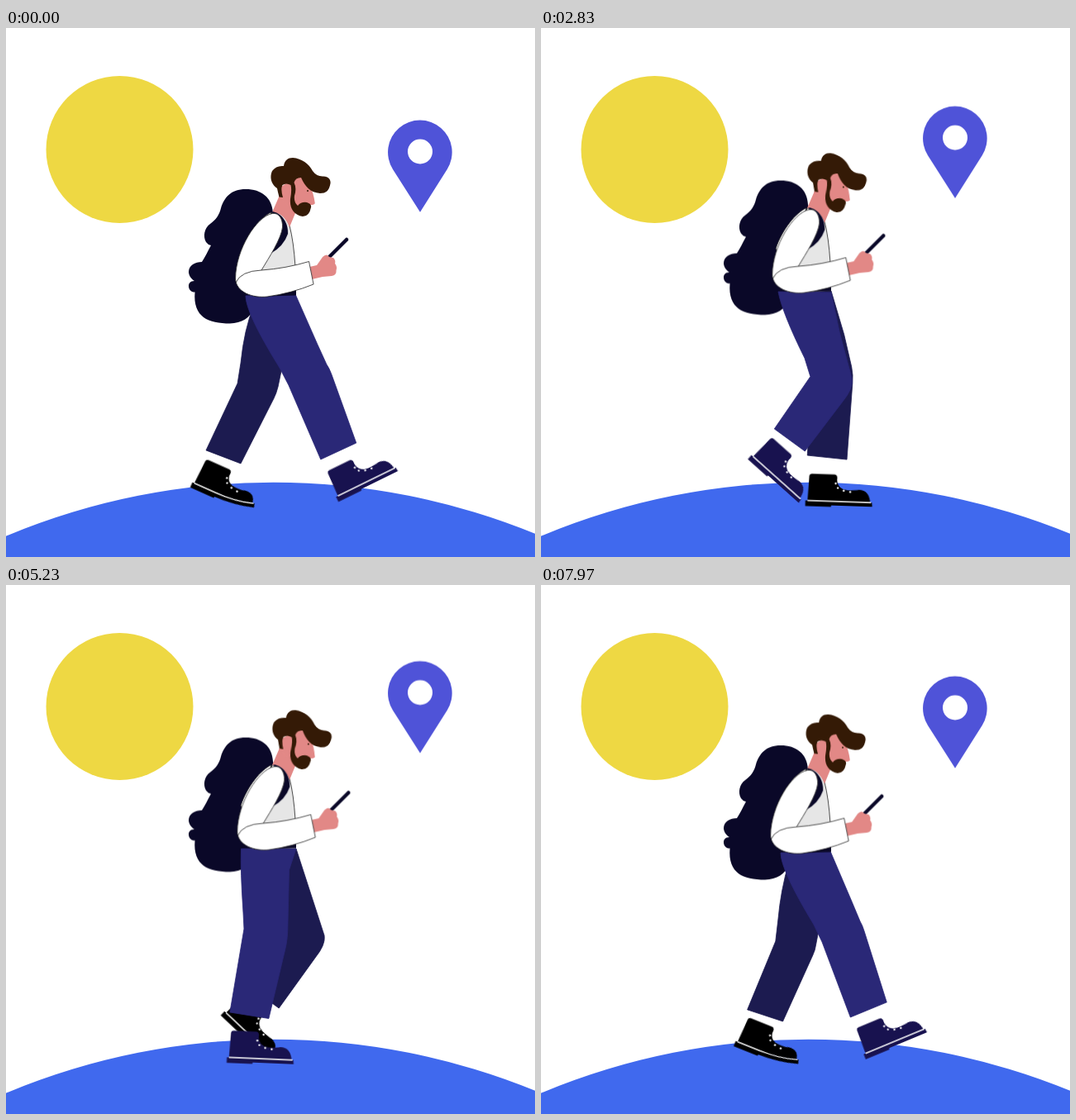
These frames come from a looping animation (640 by 640 pixels, 8000 ms). An HTML page without scripts:

```html
<!DOCTYPE html>
<html lang="en">
<head>
<meta charset="utf-8">
<title>Hiker</title>
<style>
html, body { margin: 0; width: 100%; height: 100%; overflow: hidden; background: #fff; }
svg { display: block; width: 100%; height: 100%; }

.near { --pants: #2a2877; --boot: #18124f; --lag: -800ms; }
.far { --pants: #1c1b50; --boot: #000; --lag: 0ms; }
.pants { fill: var(--pants); stroke: var(--pants); stroke-width: .8; stroke-linejoin: round; }
.upper, .sole { fill: var(--boot); }
.welt { fill: none; stroke: #fff; stroke-width: 1.3; }
.laces { fill: none; stroke: #fff; stroke-width: 2.4; stroke-linecap: round; }
.skin { fill: #e28886; }
.hair { fill: #341a06; }
.navy { fill: #0a0828; }
.edge { stroke: #222; stroke-width: .8; }

.near .pants { animation: nearPants 1.6s linear infinite; }
.near .foot { animation: nearFoot 1.6s linear infinite; }
.far .pants { animation: farPants 1.6s linear infinite; }
.far .foot { animation: farFoot 1.6s linear infinite; }
.upper { animation: upper 1.6s linear var(--lag) infinite; }
.sole { animation: sole 1.6s linear var(--lag) infinite; }
.welt { animation: welt 1.6s linear var(--lag) infinite; }

/* rise slows toward the top, fall speeds up to a sharp turn */
.pin, .pack, .torso, .arm, .head { animation: 1.6s infinite; }
.pin { animation-name: pin; }
.pack, .torso, .arm, .head { animation-duration: .8s; }
.pack { animation-name: pack; }
.torso { animation-name: torso; }
.arm { animation-name: arm; }
.head { animation-name: head; }
@keyframes pin {
  0%, 100% { transform: translateY(0); animation-timing-function: cubic-bezier(.167,.167,.667,1); }
  50% { transform: translateY(-28.5px); animation-timing-function: cubic-bezier(.333,0,.833,.833); }
}
@keyframes pack {
  0%, 100% { transform: translateY(0); animation-timing-function: cubic-bezier(.167,.167,.667,1); }
  50% { transform: translateY(-10.6px); animation-timing-function: cubic-bezier(.333,0,.833,.833); }
}
@keyframes torso {
  0%, 100% { transform: translateY(0); animation-timing-function: cubic-bezier(.167,.167,.667,1); }
  50% { transform: translateY(-5.2px); animation-timing-function: cubic-bezier(.333,0,.833,.833); }
}
@keyframes arm {
  0%, 100% { transform: translate(0, 0); animation-timing-function: cubic-bezier(.167,.167,.667,1); }
  50% { transform: translate(2.3px, -4.8px); animation-timing-function: cubic-bezier(.333,0,.833,.833); }
}
@keyframes head {
  0%, 100% { transform: translate(355px, 195px) rotate(0deg) translate(-355px, -195px); animation-timing-function: cubic-bezier(.167,.167,.667,1); }
  50% { transform: translate(356px, 189.8px) rotate(3.5deg) translate(-355px, -195px); animation-timing-function: cubic-bezier(.333,0,.833,.833); }
}

@keyframes nearPants {
  0%, 100% { d: path("M290 324Q290 345 331 411L342 432L381 522L424 502L394 419Q391 411 388 407L377 383L350 322Z"); }
  26.9% { d: path("M284.5 319Q283.5 345 287 396L288 416L271 517L318 524.5L338 440Q341 428 341 410L342.5 345L351 319Z"); }
  40% { d: path("M287 321Q283 350 280 405L280 425L236 511L281 524L325 443Q329 430 331 412L336 360L351 320Z"); }
  50% { d: path("M290 324Q281 360 272 415L268 432L227 511L269 527L311 446Q316 430 319 415L330 370L351 322Z"); }
  57.5% { d: path("M288 320Q282 350 281 405L281 423L224 500L263 525L320 446Q332 432 334 418L340 360L351 319Z"); }
  66.9% { d: path("M287 319Q288 336 300 388L306 416L252 485L289 513L347 450Q363 435 361 424L348 335L351 318Z"); }
  77.5% { d: path("M287 319Q292 345 320 400L327 422L284 485L321 512L366 452Q379 436 377 424L362 370L351 320Z"); }
  87.5% { d: path("M288 321Q290 345 333 405L345 428L322 492L369 502L391 440Q398 425 394 412L377 375L351 321Z"); }
  98.1% { d: path("M290 324Q290 345 330 411L340 432L374 523L418 505L391 419Q389 412 386 407L376 383L350 322Z"); }
}
@keyframes farPants {
  0%, 100% { d: path("M300 335Q288 365 284 405L280 430L242 511L284 527L324 448Q327 442 329 434L333 415L345 326Z"); }
  12.5% { d: path("M300 330Q294 360 298 405L300 425L247 492L285 518L338 448Q351 434 350 420L346 370L351 320Z"); }
  26.9% { d: path("M300 325Q310 350 322 400L330 422L293 485L330 512L374 451Q387 435 385 424L374 390L351 319Z"); }
  38.75% { d: path("M300 325Q308 350 340 405L352 428L342 489L389 499L402 435Q406 422 400 408L384 375L351 320Z"); }
  50% { d: path("M300 325Q310 350 340 411L352 432L395 520L437 500L401 419Q397 411 392 405L380 381L351 322Z"); }
  66.9% { d: path("M300 325Q310 350 338 415L344 438L363 518L406 506L392 425Q391 415 389 411L378 383L351 318Z"); }
  77.5% { d: path("M300 322Q305 350 322 405L327 425L320 517L368 523L376 430Q377 420 375 410L366 370L351 318Z"); }
  98.1% { d: path("M300 335Q290 370 287 405L284 431L250 514L293 528L329 448Q332 442 333 434L336 418L346 326Z"); }
}
@keyframes nearFoot {
  0%, 100% { transform: translate(400px, 567px) rotate(-26.2deg); }
  26.9% { transform: translate(267.8px, 571.4px) rotate(2.4deg); }
  40% { transform: translate(238px, 566px) rotate(10deg); }
  50% { transform: translate(211px, 548px) rotate(27deg); }
  57.5% { transform: translate(201px, 532px) rotate(36deg); }
  66.9% { transform: translate(220.4px, 518.3px) rotate(38deg); }
  77.5% { transform: translate(257px, 517px) rotate(42deg); }
  87.5% { transform: translate(320px, 550px) rotate(4deg); }
  98.1% { transform: translate(390.3px, 567.5px) rotate(-22.4deg); }
}
@keyframes farFoot {
  0%, 100% { transform: translate(226px, 550px) rotate(24deg); }
  8.75% { transform: translate(225px, 530px) rotate(36deg); }
  17.5% { transform: translate(235px, 517px) rotate(40deg); }
  26.9% { transform: translate(264.5px, 516px) rotate(43.5deg); }
  38.75% { transform: translate(340px, 545px) rotate(5deg); }
  50% { transform: translate(418px, 563px) rotate(-26deg); }
  66.9% { transform: translate(363px, 563.5px) rotate(-7.9deg); }
  77.5% { transform: translate(318px, 572px) rotate(2.5deg); }
  87.5% { transform: translate(277px, 568px) rotate(9deg); }
  98.1% { transform: translate(236.5px, 552px) rotate(21.8deg); }
}

/* boot flexes at the toes while pushing off */
@keyframes upper {
  0%, 97%, 100% { d: path("M2 0L3.3 -30Q3.6 -32.5 6 -32.5L34 -32.5Q38 -32 37 -26Q38 -16 50 -15.5Q58 -15 62 -17Q74 -19 76 -7Q56 0 30 0Z"); }
  14%, 85% { d: path("M2 0L3.3 -30Q3.6 -32.5 6 -32.5L34 -32.5Q38 -32 37 -26Q38 -15 50 -14Q59 -14 64 -15Q76 -15 78 0Q55 0 30 0Z"); }
}
@keyframes sole {
  0%, 97%, 100% { d: path("M-.5 0L30 0Q56 0 78.5 -7.5L80 -2.5Q56 5 31 5L30.5 6.8L-.5 6.8Z"); }
  14%, 85% { d: path("M-.5 0L30 0Q55 0 80 0L80.5 5Q55 5 31 5L30.5 6.8L-.5 6.8Z"); }
}
@keyframes welt {
  0%, 97%, 100% { d: path("M2 0L30 0Q56 0 77.5 -7"); }
  14%, 85% { d: path("M2 0L30 0Q55 0 79 0"); }
}
</style>
</head>
<body>
<svg viewBox="0 0 640 640">
  <circle cx="137.5" cy="147" r="89" fill="#eed843"/>
  <circle cx="323.5" cy="1387.2" r="837.5" fill="#4069ee"/>

  <g class="pin">
    <path d="M501 222.7L468 171A38.8 38.8 0 1 1 533.7 171Z" fill="#4f53d8"/>
    <circle cx="501" cy="149.5" r="15" fill="#fff"/>
  </g>

  <path class="pack navy" d="M323 224C322 205 309 195 290 195C272 195 264 205 260 218C258 226 254 232 247 237C240 242 238 252 242 259Q244 262 248 263C244 270 241 277 237 283C229 283 221 287 221 295C221 300 225 304 228 306C223 306 221 309 221 312C221 317 225 320 228.5 319.5C226 350 245 357.5 271 357.5C285 357 296 351 300 338L330 260Z"/>

  <g class="far">
    <path class="pants"/>
    <g class="foot">
      <path class="upper"/><path class="sole"/><path class="welt"/>
      <path class="laces" d="M35.5 -22.8h0M38.2 -17.4h0M45.4 -14.2h0M53.3 -13h0" transform="translate(0 1)"/>
    </g>
  </g>
  <g class="near">
    <path class="pants"/>
    <g class="foot">
      <path class="upper"/><path class="sole"/><path class="welt"/>
      <path class="laces" d="M35.5 -22.8h0M38.2 -17.4h0M45.4 -14.2h0M53.3 -13h0" transform="translate(0 1)"/>
    </g>
  </g>

  <g class="torso">
    <path class="edge" fill="#fff" d="M321 223C309 228 292 248 284 272L300 300Z"/>
    <path class="edge" fill="#e6e6e6" d="M322 223Q338 222 343 239Q348 258 350 289L350.5 317L300 318L309 255Z"/>
    <path class="navy" d="M300 320L351 316V323.5L300 325Z"/>
    <path class="skin" d="M332 200L322 223Q336 223 343 241L350 224L348 195Z"/>
  </g>

  <g class="head">
    <path class="skin" d="M333 192L345 184L358 179L367 189Q372 199 373.8 212Q373 214 369 214L362 222L348 222L330 206Z"/>
    <path class="hair" d="M335 205L330.5 204.5Q329 199 328 194C320 188 319 180 322 173Q327 166 336 167C337 160 341 157 347 157C358 158 366 164 371 173Q376 180 384 179.5C391 180 393 184 392.5 188C391 197 387 200 380 200C368 199 362 192 357 181Q350 181 348.5 187Q352 194 349 203Q348 211 353 215Q357 210 364 211Q370 213 369 217Q367 228 359 228C348 226 343 218 344 207Q346 196 344.5 190Q339 187 334.5 190Q332 195 335 205Z"/>
    <circle cx="365" cy="197" r="1" fill="#341a06"/>
  </g>

  <g class="arm">
    <path class="navy" d="M321 222C334 223 342 237 341 249Q336 264 320 273L318 262Q330 252 333 238Z"/>
    <path d="M390 278L412 256" stroke="#0a0828" stroke-width="4.5" stroke-linecap="round"/>
    <path class="skin" d="M367 289L376 287L383 277Q388 272 391 277L396 278Q399 281 398 285Q401 289 399.5 293Q400 299 394 300L383 301L370 304Z"/>
    <path class="edge" fill="#fff" d="M322 224.5C303 228 278 268 277.5 303C278 320 299 327 316 325Q345 321 372 310L366.5 282.5Q338 291 309 293C318 278 333 255 334.5 241C335 231 330 223 322 224.5Z"/>
    <path class="edge" fill="none" d="M278 308Q284 294 309 293"/>
  </g>
</svg>
</body>
</html>
```
